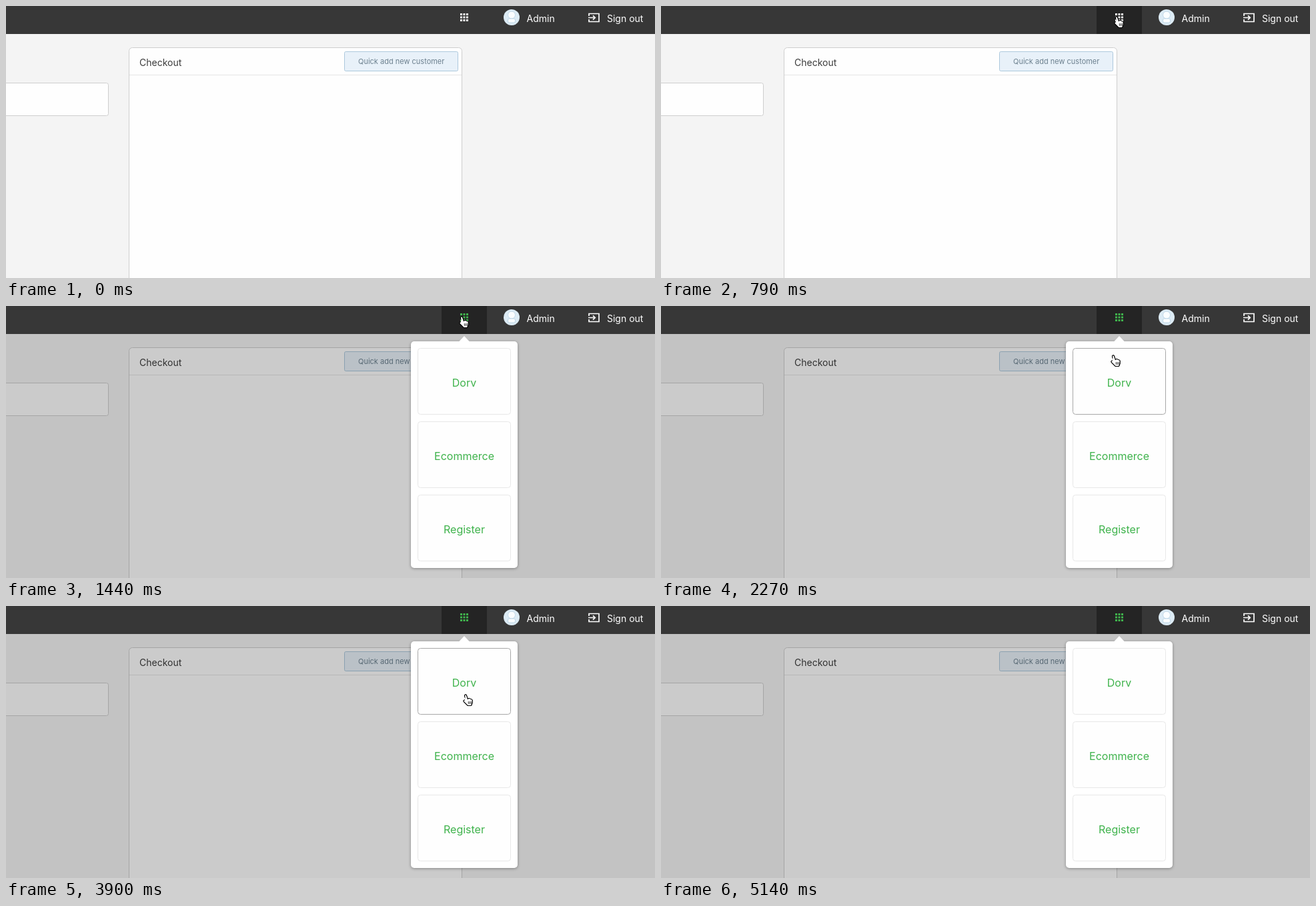
Recreate the animation shown at these times as an HTML page. Size 973 px wide and 408 px high, loop 5550 ms.

```html
<!DOCTYPE html>
<html lang="en">
<head>
<meta charset="utf-8">
<title>App switcher</title>
<style>
  html, body { margin: 0; width: 100%; height: 100%; overflow: hidden; background: #f4f4f4; }
  svg { display: block; width: 973px; height: 408px; font: 14px Inter, "Open Sans", sans-serif; }
  .card { fill: #fff; filter: drop-shadow(0 1px 2px rgba(0, 0, 0, .35)); }
  .tile rect { fill: #fefefe; stroke: #e8e8e8; }
  .tile text { font-size: 16px; fill: #3fb34c; text-anchor: middle; }
  .tile.hover rect { stroke: #a8a8a8; }
</style>
</head>
<body>
<svg viewBox="0 0 973 408">
  <g fill="#fefefe" stroke="#cecece">
    <rect x="-9.5" y="115.5" width="163" height="49" rx="3"/>
    <rect x="184.5" y="62.5" width="499" height="400" rx="5"/>
    <path d="M185 103.5H683" stroke="#e6e6e6"/>
    <rect x="507.5" y="68.5" width="170" height="29" rx="2" fill="#e8f1f9" stroke="#adc9dd"/>
  </g>
  <text x="200" y="90" fill="#3c3c3c">Checkout</text>
  <text x="528" y="87" font-size="11" fill="#6c808f">Quick add new customer</text>
  <rect id="shade" y="42" width="973" height="366"/>

  <rect width="973" height="42" fill="#373737"/>
  <rect id="cell" x="653" width="68" height="42" fill="#242424"/>
  <g id="dots"></g>
  <circle cx="758" cy="17" r="12" fill="#dcebf5"/>
  <g fill="#fafdff" stroke="#b4d0e2" stroke-width=".8">
    <circle cx="758" cy="13.5" r="5.5"/>
    <rect x="752.5" y="19" width="11" height="6" rx="2"/>
  </g>
  <g fill="#fff">
    <text x="780.5" y="24">Admin</text>
    <text x="901" y="24">Sign out</text>
  </g>
  <path d="M874 15V11.5H889V23.5H874V20M873 17.5H883M880 14.3l3.2 3.2-3.2 3.2"
        fill="none" stroke="#fff" stroke-width="1.7"/>

  <g id="popup">
    <rect class="card" x="607" y="53" width="160" height="340" rx="5"/>
    <path d="M679 53.5L687 45L695 53.5Z" fill="#fff"/>
  </g>

  <g id="hand" stroke-linecap="round" stroke-linejoin="round">
    <path id="fist" d="M4 2.5L6.5 10L9 8L12.6 9.5V13L11.5 16H8L2.5 10.5"
          stroke="#000" stroke-width="4"/>
    <use href="#fist"/>
    <path d="M4 2.5L6.5 10L9 8L12.6 9.5V13L11.5 16H8L2.5 10.5"
          fill="#fff" stroke="#fff" stroke-width="2"/>
    <path d="M8.3 11.5v3m2 -3v3m2 -3v3" stroke="#000" stroke-width=".8"/>
  </g>
  <path id="arrow" d="M0 0V15L3.5 11.8L6 17.5L8.5 16.4L6 11H10.7Z" stroke="#fff"/>
</svg>
<script>
const LOOP = 5550;
const $ = id => document.getElementById(id);
const ramp = (t, from, to) => Math.max(0, Math.min(1, (t - from) / (to - from)));

for (let i = 0; i < 9; i++) {
  $('dots').innerHTML +=
    `<rect x="${681 + i % 3 * 4.5}" y="${11 + Math.floor(i / 3) * 4.5}" width="3" height="3"/>`;
}
['Dorv', 'Ecommerce', 'Register'].forEach((name, i) => {
  const y = 63.5 + i * 110;
  $('popup').innerHTML += `<g class="tile"><rect x="617.5" y="${y}" width="139" height="99" rx="4"/>
    <text x="687" y="${y + 57.5}">${name}</text></g>`;
});
const firstTile = document.querySelector('.tile');

function move(el, x, y, visible = true) {
  el.style.display = visible ? '' : 'none';
  el.setAttribute('transform', `translate(${Math.round(x)} ${Math.round(y)})`);
}

function draw(t) {
  // The menu appears in a few coarse steps.
  const open = t < 1440 ? .22 * Math.floor(2 * ramp(t, 1200, 1320)) : 1;
  $('shade').setAttribute('opacity', open * .2);
  $('popup').setAttribute('opacity', open);
  move($('popup'), 0, (open - 1) * 7);
  $('cell').setAttribute('opacity', ramp(t, 430, 630));
  $('dots').setAttribute('fill', t < 1200 ? '#fff' : '#3fb34c');

  // The hand drops in, curves down to the first tile, drifts and leaves upwards.
  const enter = ramp(t, 450, 790), down = ramp(t, 1950, 2490), settle = ramp(t, 2540, 2830);
  const drift = ramp(t, 3850, 3960), leave = ramp(t, 4190, 4310);
  const x = 681 - 2 * enter + 2 * down - 6 * Math.sin(Math.PI * down) + 2 * settle + 4 * drift + 3 * leave;
  const y = -8 + 23 * enter + 97 * down + 20 * settle - drift - 152 * leave;
  move($('hand'), x, y, t >= 450 && leave < 1);
  firstTile.classList.toggle('hover', y > 61);

  const pass = ramp(t, 4900, 5140);
  move($('arrow'), 969 - 6 * pass, 348 + 60 * pass, pass > 0 && pass < 1);
}

const start = performance.now();
function tick() {
  draw((performance.now() - start) % LOOP);
  requestAnimationFrame(tick);
}
tick();
</script>
</body>
</html>
```
